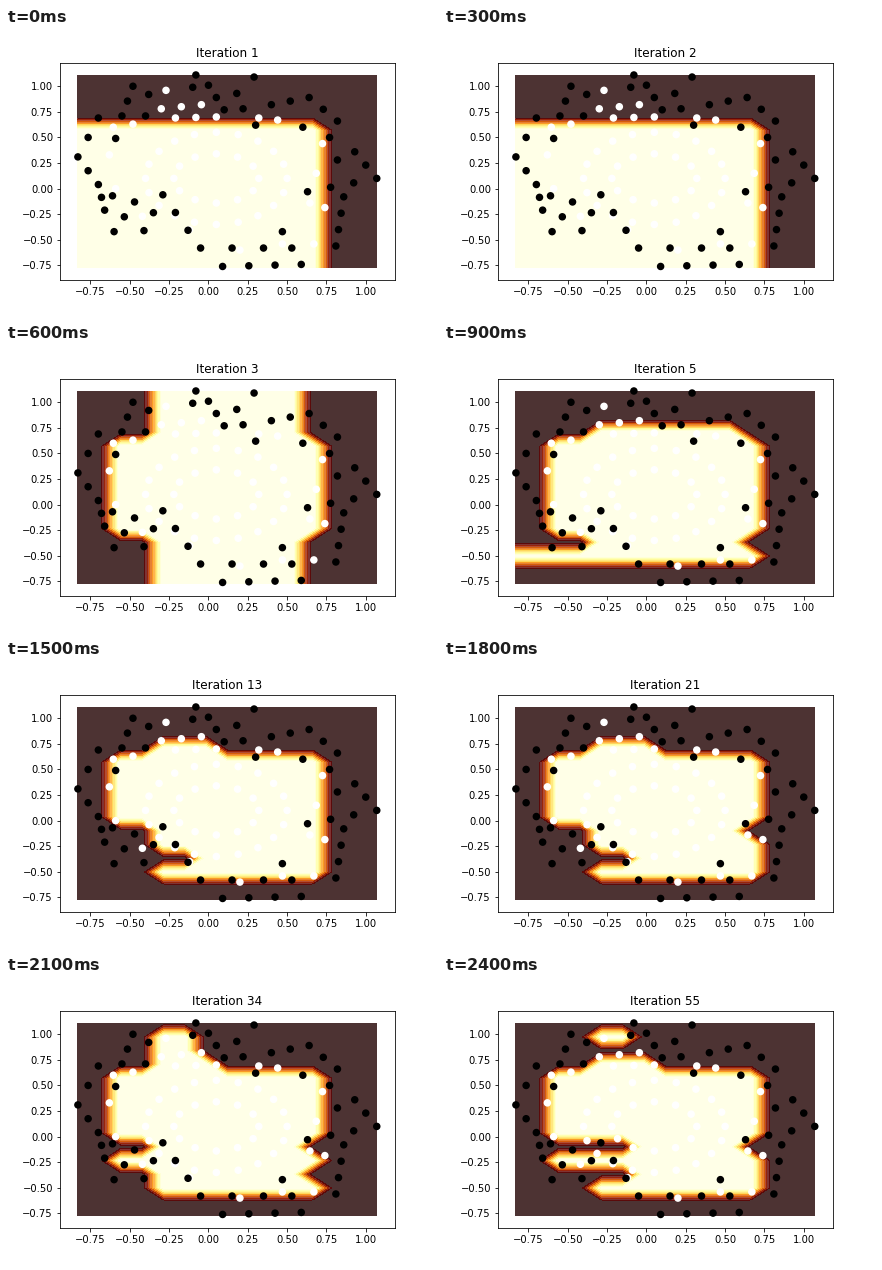
These frames come from a looping animation (432 px wide and 288 px high, 2700 ms). A matplotlib script:

```python
import math

import matplotlib.pyplot as plt
import numpy as np
from matplotlib.animation import FuncAnimation

# Grid blocks classed as inside: first column, last column, first row, last row
CORNER = (0, 11, 0, 10)
TALL_BODY = (2, 11, 4, 10)
BODY = (2, 11, 6, 10)
CAP = (4, 6, 11, 11)
FOOT = (4, 11, 2, 2)
ANKLE = (4, 10, 3, 3)
SHORT_ANKLE = (6, 11, 3, 3)
FINGER = (2, 11, 4, 4)
WAIST = (4, 10, 5, 5)

STAGES = [
    [CORNER],
    [CORNER],
    [TALL_BODY, (4, 10, 0, 14)],
    [TALL_BODY, (4, 10, 11, 11), ANKLE, (0, 11, 2, 2)],
    [TALL_BODY, CAP, ANKLE, FOOT],
    [BODY, CAP, (4, 11, 4, 5), SHORT_ANKLE, FOOT],
    [BODY, CAP, WAIST, (4, 11, 4, 4), SHORT_ANKLE, FOOT],
    [BODY, CAP, (4, 5, 12, 13), WAIST, FINGER, ANKLE, FOOT],
    [BODY, CAP, (4, 5, 13, 13), (6, 10, 5, 5), FINGER, SHORT_ANKLE, FOOT],
]

GRID_X = np.linspace(-0.83007, 1.0709, 15)
GRID_Y = np.linspace(-0.76974, 1.1089, 15)
LEVELS = np.linspace(-1, 1, 9)
TICKS = np.arange(-0.75, 1.01, 0.25)


def trail(step, *corners):
    """Dots along a polyline: one at each corner, more on legs longer than step."""
    dots = []
    for a, b in zip(corners, corners[1:]):
        count = max(1, round(math.dist(a, b) / step))
        dots += [tuple(np.add(a, np.subtract(b, a) * k / count))
                 for k in range(count)]
    return dots + [corners[-1]]


def ring(count, rx, ry):
    angles = np.linspace(0, 2 * np.pi, count, endpoint=False)
    return [(0.05 + rx * math.cos(a), 0.1 + ry * math.sin(a)) for a in angles]


INSIDE = (
    trail(.165, (-.27, .96), (-.30, .78), (-.045, .82), (.05, .70), (-.21, .69))
    + trail(.3, (-.48, .63), (-.605, .60), (-.63, .33), (-.59, 0), (-.42, -.27),
            (-.12, -.40), (.20, -.60), (.47, -.54), (.67, -.54), (.74, -.185),
            (.645, -.14), (.725, .44), (.44, .67), (.32, .69))
    + ring(20, .45, .45) + ring(12, .27, .24)
)
OUTSIDE = (
    trail(.165, (-.08, 1.11), (-.10, .99), (0, 1.01), (.10, .77), (.18, .93),
          (.29, 1.09))
    + trail(.165, (.22, .78), (.30, .62), (.40, .82), (.64, .89), (.82, .66),
            (.60, .60), (.77, .50), (.82, .28), (.93, .36), (1.07, .10),
            (.63, -.03), (.86, -.08), (.81, -.56))
    + trail(.165, (.09, -.76), (.59, -.74), (.47, -.42), (.35, -.58), (-.05, -.58),
            (-.29, -.06), (-.41, -.41), (-.60, -.42), (-.47, -.13), (-.61, -.07),
            (-.66, -.21), (-.70, .04), (-.83, .31), (-.70, .69), (-.59, .49),
            (-.55, .71), (-.48, 1), (-.38, .92), (-.40, .71))
)
DOTS = np.array(INSIDE + OUTSIDE)
DOT_COLORS = ["white"] * len(INSIDE) + ["black"] * len(OUTSIDE)

fig = plt.figure(figsize=(6, 4), dpi=72, facecolor="white")
ax = fig.add_axes([0.125, 0.125, 0.775, 0.755])


def iteration_number(stage):
    """Fibonacci numbers 1, 2, 3, 5, 8, ..."""
    a, b = 1, 2
    for _ in range(stage):
        a, b = b, a + b
    return a


def classify(blocks):
    z = -np.ones((len(GRID_Y), len(GRID_X)))
    for col0, col1, row0, row1 in blocks:
        z[row0:row1 + 1, col0:col1 + 1] = 1
    return z


def draw(stage):
    ax.clear()
    ax.contourf(GRID_X, GRID_Y, classify(STAGES[stage]), levels=LEVELS,
                cmap="afmhot", alpha=0.8)
    ax.scatter(DOTS[:, 0], DOTS[:, 1], s=36, c=DOT_COLORS, linewidths=1.5)
    ax.set(xlim=(-0.94385, 1.18468), ylim=(-0.89219, 1.23135),
           xticks=TICKS, yticks=TICKS)
    ax.set_title(f"Iteration {iteration_number(stage)}")


anim = FuncAnimation(fig, draw, frames=len(STAGES), interval=300, repeat=True)
plt.show()
```
